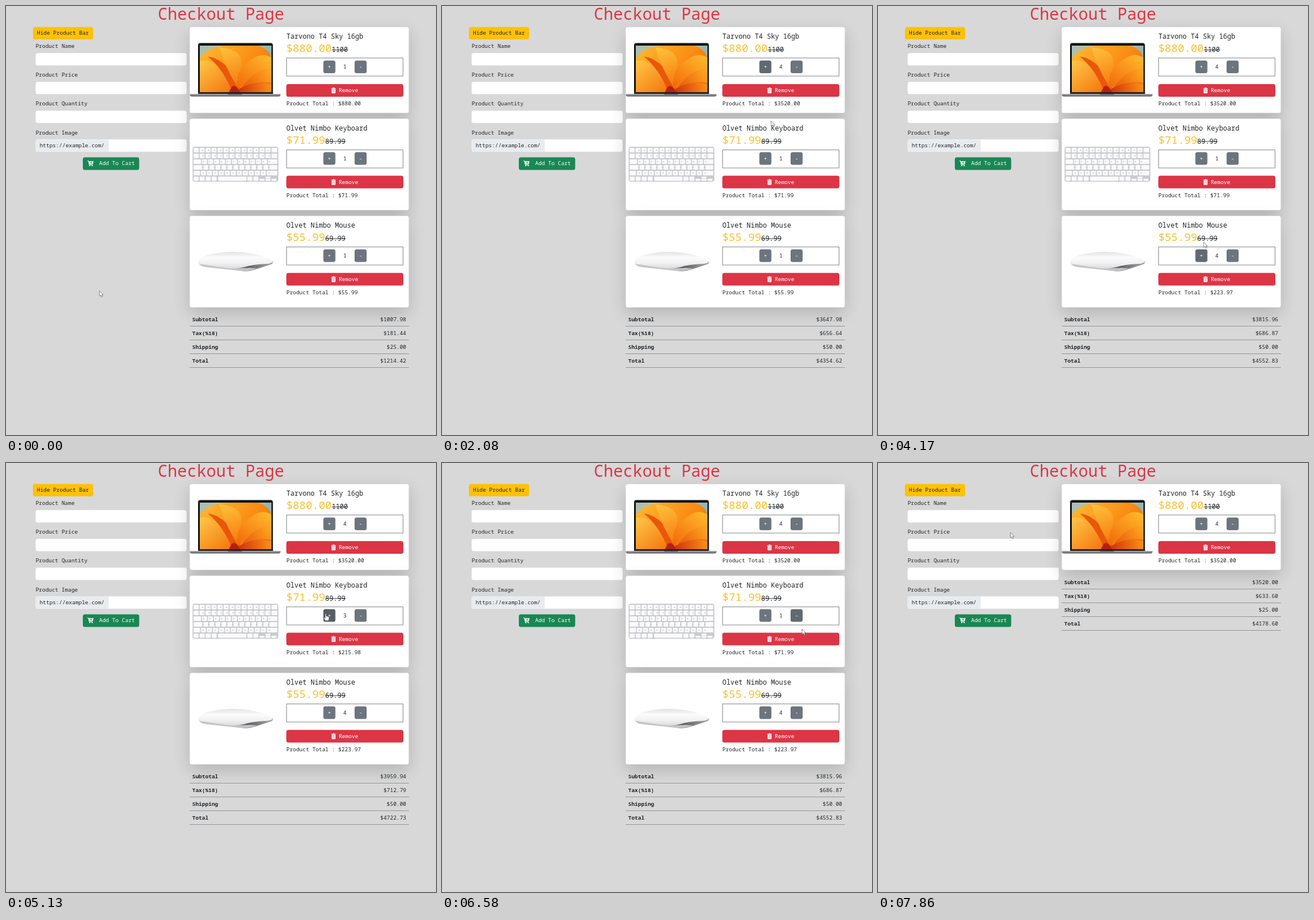
Animation of 750x747 px, one loop 8 s. Source, as an HTML page with a canvas:

```html
<!DOCTYPE html>
<html lang="en">
<head>
<meta charset="utf-8">
<title>Checkout Page</title>
<style>
  html, body { margin: 0; width: 100%; height: 100%; overflow: hidden; background: #d8d8d8; }
  canvas { display: block; width: 750px; height: 747px; }
</style>
</head>
<body>
<canvas id="stage"></canvas>
<script>
const W = 750, H = 747, LOOP = 8000;
const canvas = document.getElementById('stage');
const ctx = canvas.getContext('2d');
const dpr = window.devicePixelRatio || 1;
canvas.width = W * dpr;
canvas.height = H * dpr;

const FONT = '"Noto Sans Mono", "DejaVu Sans Mono", monospace';
const SMALL = 9.43, MEDIUM = 11.78, LARGE = 18.85, TITLE = 28.27;
const INK = '#212529', RED = [220, 53, 69], RED_DARK = [187, 45, 59];
const GREY = [108, 117, 125], GREY_DARK = [86, 94, 100];

// The screen updates in steps of 160 ms with three longer pauses.
const pauses = { 3680: 330, 4490: 320, 6250: 330 };
const ticks = [];
for (let t = 0; t < LOOP; t += pauses[t] || 160) ticks.push(t);

// Pointer tip: time, x, y
const path = [
  [0, 163, 496], [1120, 549, 142], [1280, 559, 107], [1920, 560, 106],
  [2080, 574, 200], [2240, 594, 302], [2400, 600, 336], [2720, 606, 452],
  [2880, 605, 454], [3200, 567, 432], [3360, 567, 431], [4010, 567, 431],
  [4170, 568, 411], [4330, 560, 337], [4490, 548, 268], [4810, 557, 263],
  [5290, 558, 262], [5770, 621, 264], [5930, 625, 265], [6250, 626, 266],
  [6580, 628, 289], [6740, 629, 306], [6900, 629, 311], [7380, 629, 311],
  [7540, 321, 184], [7700, 274, 151], [7860, 231, 121], [8000, 231, 121]
];

const items = {
  laptop: { name: 'Tarvono T4 Sky 16gb', old: 1100, draw: drawLaptop },
  keyboard: { name: 'Olvet Nimbo Keyboard', old: 89.99, draw: drawKeyboard },
  mouse: { name: 'Olvet Nimbo Mouse', old: 69.99, draw: drawMouse }
};
for (const item of Object.values(items)) item.price = item.old * 0.8;

const cardShift = [0, 159.5, 328.7];
const rowStep = 169.2;

const money = v => '$' + v.toFixed(2);
const after = (times, t) => times.filter(at => at <= t).length;

function pointerAt(t) {
  const i = Math.max(1, path.findIndex(p => p[0] >= t));
  const [t0, x0, y0] = path[i - 1], [t1, x1, y1] = path[i];
  const u = (t - t0) / (t1 - t0);
  const k = i === 1 ? u * u * (3 - 2 * u) : u;
  return { x: x0 + (x1 - x0) * k, y: y0 + (y1 - y0) * k };
}

function cartAt(t) {
  const qty = {
    laptop: 1 + after([1440, 1600, 1760], t),
    mouse: 1 + after([3520, 3680, 4010], t),
    keyboard: 1 + after([4970, 5130, 5290], t) - after([5930, 6090, 6250], t)
  };
  let keys = ['laptop', 'keyboard', 'mouse'];
  if (t >= 7060) keys = ['laptop', 'mouse'];
  if (t >= 7380) keys = ['laptop'];
  // Each slot keeps its own counter, even when the item in it changes.
  const slots = [qty.laptop, qty.keyboard, qty.mouse];
  const subtotal = keys.reduce((sum, k) => sum + items[k].price * qty[k], 0);
  return { keys, slots, subtotal };
}

function box(x, y, w, h, r, fill) {
  ctx.fillStyle = fill;
  ctx.beginPath();
  ctx.roundRect(x, y, w, h, r);
  ctx.fill();
}

function text(s, x, y, size = SMALL, color = INK, align = 'left', weight = 400) {
  ctx.font = `${weight} ${size}px ${FONT}`;
  ctx.textAlign = align;
  ctx.fillStyle = color;
  ctx.fillText(s, x, y);
}

function shape(d, fill) {
  ctx.fillStyle = fill;
  ctx.fill(new Path2D(d));
}

function gradient(x0, y0, x1, y1, ...colors) {
  const g = ctx.createLinearGradient(x0, y0, x1, y1);
  colors.forEach((c, i) => g.addColorStop(i / (colors.length - 1), c));
  return g;
}

const mix = (a, b, k) => `rgb(${a.map((v, i) => v + (b[i] - v) * k).join(',')})`;

function drawLaptop() {
  box(335, 64.5, 130.5, 89, [4, 4, 0, 0], '#111214');
  ctx.save();
  ctx.beginPath();
  ctx.rect(338, 69, 125, 81);
  ctx.clip();
  ctx.fillStyle = gradient(338, 69, 463, 110, '#a9bdb4', '#cfc58c', '#82b2bd');
  ctx.fillRect(338, 69, 125, 81);
  shape('M338 90 Q355 69 390 69 H440 Q463 76 463 96 V150 H338Z',
    gradient(350, 70, 450, 150, '#ffb52e', '#fb9318', '#f06a0c'));
  shape('M338 150 V96 Q372 88 395 150Z', gradient(340, 95, 385, 150, '#ffc547', '#f47b10'));
  shape('M352 88 Q388 92 412 150 H395 Q378 108 352 88Z', '#e9570a');
  shape('M372 72 Q420 76 408 112 Q398 126 407 146 Q384 112 372 72Z',
    gradient(380, 72, 405, 140, '#ffc13b', '#f57a0e'));
  shape('M406 144 Q396 116 424 96 Q446 78 463 90 V110 Q430 112 406 144Z',
    gradient(450, 85, 405, 140, '#ffb42a', '#f26c0b'));
  shape('M407 147 Q430 112 463 110 V134 Q430 128 407 147Z',
    gradient(460, 112, 410, 147, '#ffa51f', '#e65308'));
  shape('M400 150 Q428 127 463 136 V150Z', gradient(460, 140, 405, 150, '#fb8b15', '#cf300b'));
  shape('M389 150 Q397 128 408 150Z', '#b8200f');
  ctx.restore();
  box(335, 150, 130.5, 3, 0, '#242428');
  box(320.5, 153, 158.5, 4.5, [1, 1, 6, 6], gradient(0, 153, 0, 157.5, '#b4b4ba', '#85858b', '#4a4a50'));
  box(387, 153, 25, 1.8, [0, 0, 2, 2], '#66666c');
}

function key(x, y, w, h = 8) {
  box(x, y, w, h, 1.3, '#fafafb');
}

function drawKeyboard() {
  box(325.5, 245, 149.5, 61, 4, '#c9cace');
  const step = 10.45;
  for (let row = 0; row < 5; row++) {
    const y = 247 + row * 10;
    const lead = [8.7, 8.7, 13, 15.5, 11][row];
    key(327.3, y, lead);
    let x = 327.3 + lead + 1.6;
    while (x + step < 464) {
      key(x, y, 8.8);
      x += step;
    }
    key(x, y, 473.2 - x);
  }
  for (let i = 0; i < 4; i++) key(327.3 + i * step, 297, 8.8, 7.4);
  key(370, 297, 49.5, 7.4);
  key(421, 297, 8.8, 7.4);
  key(431.4, 297, 8.8, 7.4);
  for (let i = 0; i < 3; i++) key(442 + i * step, 300.8, 9, 3.6);
  key(442 + step, 297, 9, 3.2);
  ctx.fillStyle = '#b6b7bc';
  for (let row = 0; row < 5; row++) {
    for (let i = 0; i < 12; i++) ctx.fillRect(342 + i * step + row % 3, 250.2 + row * 10, 1.8, 1.5);
  }
}

function drawMouse() {
  shape('M335 445 Q336 451 346 453 L410 461 Q422 463 434 459 L462 450 Q467 448 465 444Z',
    gradient(335, 0, 466, 0, '#d4d4d6', '#9a9a9d', '#626266', '#a8a8aa'));
  shape('M336 447 Q338 454 352 455 L411 461.5 Q424 462 438 457 L425 456 Q390 459 336 447Z', '#c4c4c6');
  shape('M335 446 Q337 437 354 433 Q392 424 428 431 Q456 436 465 445 Q464 448 455 449 Q430 450 414 455 Q398 459 376 455 L343 450 Q335 449 335 446Z',
    gradient(0, 428, 0, 457, '#e2e2e4', '#fbfbfc', '#f2f2f3', '#dcdcde'));
}

function drawTrash(x, y) {
  ctx.fillStyle = '#fff';
  ctx.fillRect(x, y + 1, 8, 1.2);
  ctx.fillRect(x + 2.6, y, 2.8, 1.2);
  box(x + 0.6, y + 2.8, 6.8, 7.2, [0, 0, 1, 1], '#fff');
  ctx.fillStyle = 'rgba(220,53,69,.75)';
  for (let i = 0; i < 3; i++) ctx.fillRect(x + 2 + i * 1.7, y + 4, 0.6, 4.7);
}

function drawCartIcon(x, y) {
  ctx.strokeStyle = '#fff';
  ctx.lineWidth = 1;
  ctx.stroke(new Path2D(`M${x} ${y + 0.7} h1.7 l1.5 6.8 h6`));
  shape(`M${x + 2} ${y + 1.3} h8.8 l-1.4 5 h-6.3Z`, '#fff');
  ctx.fillStyle = '#fff';
  for (const dx of [4, 8.5]) {
    ctx.beginPath();
    ctx.arc(x + dx, y + 9, 1.1, 0, 7);
    ctx.fill();
  }
  ctx.fillStyle = '#198754';
  ctx.fillRect(x + 4.8, y + 3.3, 3.2, 0.8);
  ctx.fillRect(x + 6, y + 2.1, 0.8, 3.2);
}

function drawForm() {
  text('Checkout Page', 375, 24, TITLE, '#dc3545', 'center');
  box(47, 36.6, 105, 21.4, 3.5, '#ffc107');
  text('Hide Product Bar', 54, 50.2);
  ['Name', 'Price', 'Quantity', 'Image'].forEach((label, i) => {
    const y = 70 + i * 50.1;
    text('Product ' + label, 51.7, y + 3.2);
    box(51.7, y + 12, 263.3, 21.5, 3.5, '#fff');
  });
  box(51.7, 232.3, 127.5, 21.5, [3.5, 0, 0, 3.5], '#e9ecef');
  text('https://example.com/', 58.7, 246.2);
  box(134, 263.5, 98.3, 22, 3.5, '#198754');
  drawCartIcon(142, 269);
  text('Add To Cart', 162.5, 277.4, SMALL, '#fff', 'left', 500);
}

function buttonsOf(dy) {
  return [
    { x: 553.5, y: 95 + dy, w: 21, h: 22, from: GREY, to: GREY_DARK },
    { x: 608, y: 95 + dy, w: 21, h: 22, from: GREY, to: GREY_DARK },
    { x: 489, y: 136 + dy, w: 204, h: 22, from: RED, to: RED_DARK }
  ];
}

const inside = (p, b) => p.x >= b.x && p.x <= b.x + b.w && p.y >= b.y && p.y <= b.y + b.h;

function drawCard(slot, item, qty, now, before) {
  const dy = cardShift[slot];
  ctx.save();
  ctx.shadowColor = 'rgba(0,0,0,.175)';
  ctx.shadowBlur = 28.3 * dpr;
  ctx.shadowOffsetY = 9.4 * dpr;
  box(320.5, 36.8 + dy, 382, slot ? 159.2 : 149.5, 3.5, '#fff');
  ctx.restore();

  ctx.save();
  if (item === items.mouse) ctx.translate(0, (slot - 2) * rowStep);
  item.draw();
  ctx.restore();

  text(item.name, 489, 57 + dy, MEDIUM);
  const price = money(item.price);
  const end = 489 + price.length * LARGE * 0.6;
  const old = String(item.old);
  text(price, 489, 80.3 + dy, LARGE, '#fcbf2b');
  text(old, end, 80.3 + dy, MEDIUM);
  ctx.fillStyle = INK;
  ctx.fillRect(end, 76 + dy, old.length * MEDIUM * 0.6, 0.9);

  ctx.strokeStyle = '#85888b';
  ctx.lineWidth = 1;
  ctx.strokeRect(489.5, 90.5 + Math.round(dy), 203, 31.5);

  for (const b of buttonsOf(dy)) {
    const level = (inside(now, b) + inside(before, b)) / 2;
    box(b.x, b.y, b.w, b.h, 3.5, mix(b.from, b.to, level));
  }
  text('+', 564, 109.3 + dy, SMALL, '#fff', 'center');
  text(qty, 591, 109.3 + dy, SMALL, INK, 'center');
  text('-', 618.5, 109.3 + dy, SMALL, '#fff', 'center');
  drawTrash(567.3, 142 + dy);
  text('Remove', 580.4, 150.3 + dy, SMALL, '#fff');
  text('Product Total : ' + money(item.price * qty), 489, 173.2 + dy);
}

function drawSummary(cart) {
  const shift = (cart.keys.length - 3) * rowStep;
  const tax = cart.subtotal * 0.18;
  const shipping = cart.subtotal > 3600 ? 50 : 25;
  const rows = [
    ['Subtotal', cart.subtotal], ['Tax(%18)', tax],
    ['Shipping', shipping], ['Total', cart.subtotal + tax + shipping]
  ];
  rows.forEach(([label, value], i) => {
    const y = 546 + shift + i * 23.9;
    text(label, 324.8, y + 3.2, SMALL, INK, 'left', 700);
    text(money(value), 698, y + 3.2, SMALL, INK, 'right');
    ctx.fillStyle = '#929496';
    ctx.fillRect(320.3, Math.round(y + 11.3), 382.4, 1);
  });
}

const ARROW = new Path2D('M0 0 V9.3 L2.2 7.4 L3.8 10.8 L5.4 10 L3.9 6.8 H6.6Z');
const HAND = new Path2D('M-1 1 Q0 -.6 1 1 V4.5 Q2 3.7 2.8 4.8 Q3.8 4.1 4.5 5.2 Q5.8 4.9 5.8 6.4 V9 Q5.4 11 4.6 12.3 H-.4 Q-2.2 9.6 -3.9 7.5 Q-3.8 5.9 -2.3 6.8 L-1 8Z');

function drawPointer(p, isHand) {
  ctx.save();
  ctx.translate(p.x, p.y);
  ctx.lineWidth = 0.8;
  ctx.lineJoin = 'round';
  ctx.strokeStyle = isHand ? '#45484c' : '#66686b';
  ctx.fillStyle = '#fff';
  const form = isHand ? HAND : ARROW;
  ctx.fill(form);
  ctx.stroke(form);
  ctx.restore();
}

function render(ms) {
  const i = ticks.findLastIndex(t => t <= ms);
  const now = pointerAt(ticks[i]);
  const before = pointerAt(ticks[Math.max(0, i - 1)]);
  const cart = cartAt(ticks[i]);

  ctx.setTransform(dpr, 0, 0, dpr, 0, 0);
  ctx.fillStyle = '#d8d8d8';
  ctx.fillRect(0, 0, W, H);
  drawForm();
  cart.keys.forEach((k, slot) => drawCard(slot, items[k], cart.slots[slot], now, before));
  drawSummary(cart);
  const isHand = cart.keys.some((k, slot) => buttonsOf(cardShift[slot]).some(b => inside(now, b)));
  drawPointer(now, isHand);
}

const start = performance.now();
function loop() {
  render((performance.now() - start) % LOOP);
  requestAnimationFrame(loop);
}
loop();
</script>
</body>
</html>
```
